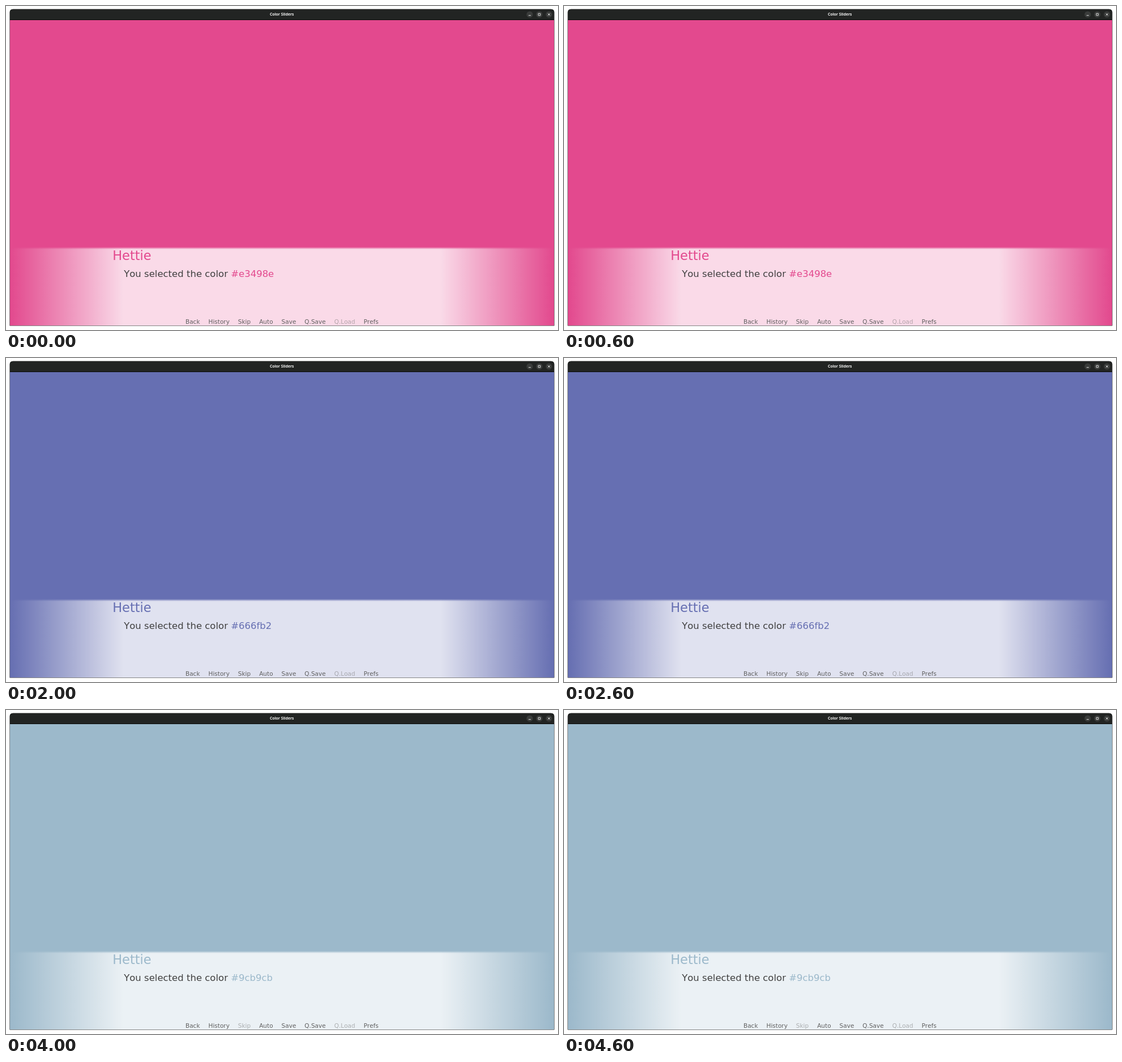
Animation, 975 px wide and 574 px high, one loop 5000 ms. Source, as an HTML page:

```html
<!DOCTYPE html>
<html lang="en">
<head>
<meta charset="utf-8">
<title>Color Sliders</title>
<style>
  html, body { margin: 0; width: 100%; height: 100%; overflow: hidden; background: #fff; }
  svg { display: block; }
  text { font-family: "DejaVu Sans", sans-serif; font-kerning: none; white-space: pre; }
  .tint { fill: var(--pick); }
  .title { font: 700 6.85px "Open Sans", "Noto Sans", sans-serif; fill: #f4f4f4; text-anchor: middle; }
  .name { font-size: 22.5px; }
  .line { font-size: 16.5px; fill: #404040; }
  .menu { font-size: 10.5px; fill: #606060; text-anchor: middle; }
  .off { fill: #707070; fill-opacity: .5; }
</style>
</head>
<body>
<svg width="975" height="574" viewBox="0 0 975 574">
  <defs>
    <linearGradient id="sides">
      <stop offset="0" stop-color="#fff" stop-opacity="0"/>
      <stop offset=".208" stop-color="#fff" stop-opacity=".8"/>
      <stop offset=".792" stop-color="#fff" stop-opacity=".8"/>
      <stop offset="1" stop-color="#fff" stop-opacity="0"/>
    </linearGradient>
    <linearGradient id="top" gradientUnits="userSpaceOnUse" x1="0" y1="427" x2="0" y2="431">
      <stop offset="0" stop-color="#000"/>
      <stop offset="1" stop-color="#fff"/>
    </linearGradient>
    <mask id="fade">
      <rect x="7" y="427" width="961" height="139" fill="url(#top)"/>
    </mask>
  </defs>

  <!-- Window frame and title bar -->
  <path d="M6.500 566.500V11.500q0-6 6-6H962.500q6 0 6 6V566.500z" fill="#0a0b0a"/>
  <path d="M7 24V11.500q0-5.500 5.500-5.500H962.500q5.500 0 5.500 5.500V24z" fill="#222423"/>
  <text class="title" x="487.2" y="17.4">Color Sliders</text>
  <g fill="#3a3c3b">
    <circle cx="925" cy="15" r="5.6"/>
    <circle cx="942" cy="15" r="5.6"/>
    <circle cx="959" cy="15" r="5.6"/>
  </g>
  <path d="M923 16.7h4M940.2 13.2h3.6v3.6h-3.6zM957.2 13.2l3.6 3.6m0-3.6l-3.6 3.6"
        fill="none" stroke="#f4f4f4" stroke-width=".9"/>

  <!-- Picked color and dialogue box -->
  <rect class="tint" x="7" y="25" width="961" height="541"/>
  <rect x="7" y="427" width="961" height="139" fill="url(#sides)" mask="url(#fade)"/>
  <text class="name tint" x="188.2" y="450">Hettie</text>
  <text class="line" x="208.2" y="479.5">You selected the color <tspan class="tint" id="hex"></tspan></text>
  <text class="menu" id="menu" x="487.5" y="563"></text>
</svg>
<script>
  const colors = ["#e3498e", "#e3c949", "#666fb2", "#37cb7a", "#9cb9cb"];
  const labels = ["Back", "History", "Skip", "Auto", "Save", "Q.Save", "Q.Load", "Prefs"];
  const hex = document.getElementById("hex");
  const menu = document.getElementById("menu");

  menu.innerHTML = labels.map((label, i) => `<tspan dx="${i ? 15 : 0}">${label}</tspan>`).join("");
  menu.children[6].classList.add("off");

  let shown = -1;
  function draw(now) {
    const step = Math.floor(now / 1000) % colors.length;
    if (step !== shown) {
      shown = step;
      document.documentElement.style.setProperty("--pick", colors[step]);
      hex.textContent = colors[step];
      menu.children[2].classList.toggle("off", step === colors.length - 1);
    }
    requestAnimationFrame(() => draw(performance.now()));
  }
  draw(0);
</script>
</body>
</html>
```
